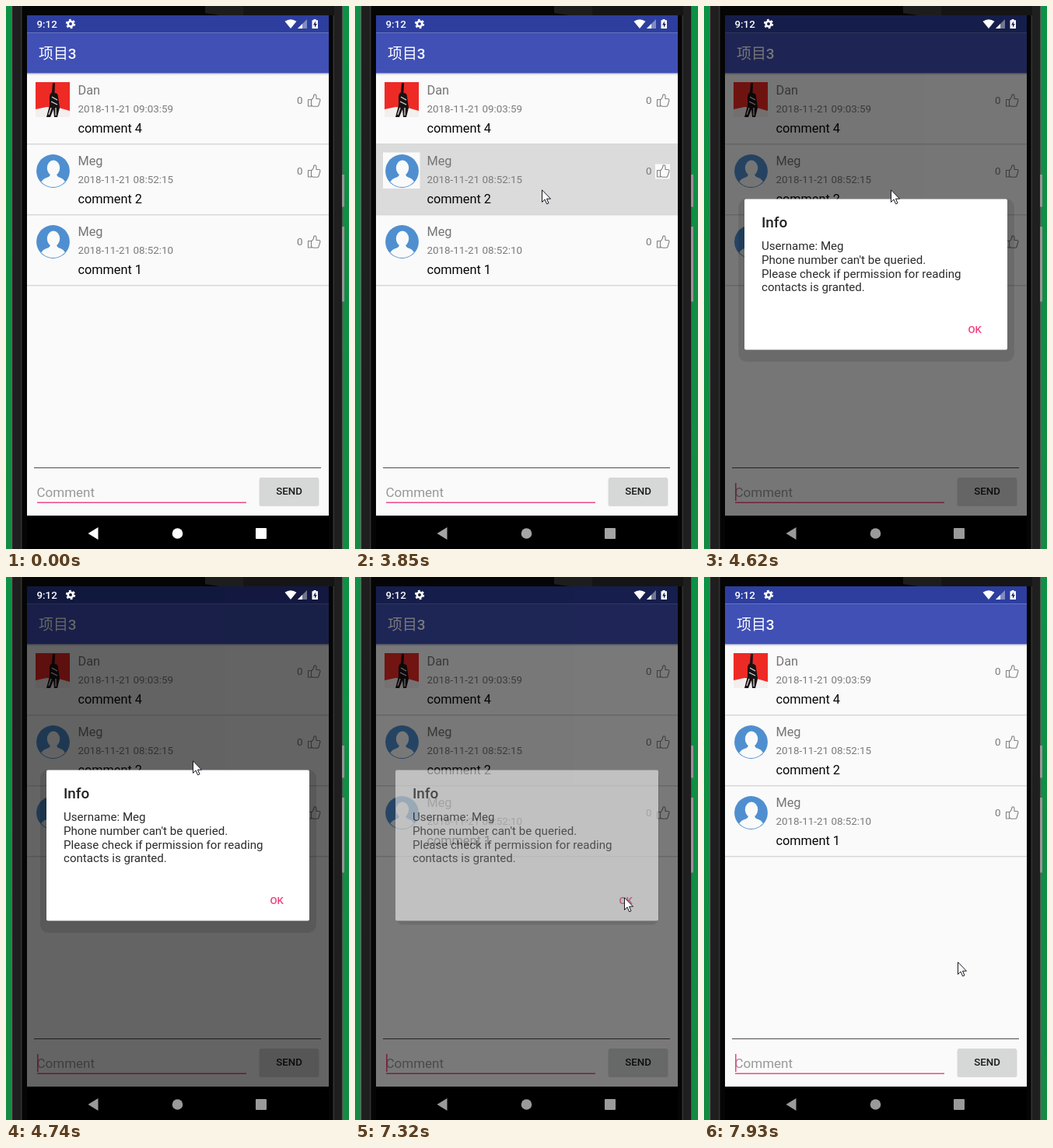
An HTML page that plays this animation: 441 px wide and 699 px high, repeating every 8000 ms.

```html
<!DOCTYPE html>
<html lang="zh-CN">
<head>
<meta charset="utf-8">
<title>Comments</title>
<style>
  html, body { margin: 0; width: 100%; height: 100%; overflow: hidden; background: #000; }
  svg { display: block; width: 100vw; height: 100vh; }
  text { font-family: Roboto, "Noto Sans CJK SC", "Noto Sans CJK", sans-serif; }
  .medium { font-weight: 500; }
  .name { font-size: 16.3px; fill: #757575; }
  .date { font-size: 13.4px; fill: #7b7b7b; }
  .body { font-size: 16.3px; fill: #060606; }
  .info { font-size: 15.1px; fill: #2b2b2b; }

  .anim { animation: 8s linear infinite; }
  #press { animation-name: press; }
  #caret { animation-name: caret; animation-timing-function: step-end; }
  #dim { animation-name: dim; }
  #shade { animation-name: shade; transform-box: fill-box; transform-origin: center; }
  #dialog { animation-name: dialog; }
  #nav { animation-name: nav; }
  #pointer { animation-name: show, move; animation-timing-function: step-end; }

  @keyframes press {
    0%, 46% { opacity: 0; }
    48.125%, 53.1% { opacity: 1; }
    54.4%, 100% { opacity: 0; }
  }
  @keyframes caret {
    0% { opacity: 0; }
    26.875% { opacity: 1; }
    46.125% { opacity: 0; }
    53.125%, 100% { opacity: 1; }
  }
  @keyframes dim {
    0%, 55.5% { opacity: 0; }
    56.25% { opacity: .08; }
    58%, 90.25% { opacity: .6; }
    91.5%, 92.74% { opacity: .52; }
    92.75% { opacity: .32; }
    95%, 100% { opacity: 0; }
  }
  @keyframes shade {
    0%, 55.5% { opacity: 0; transform: scale(.98); }
    56.25% { opacity: .055; transform: scale(.99); }
    58%, 90.25% { opacity: .11; transform: none; }
    91.5%, 92.74% { opacity: .1; transform: translateY(-5px) scale(.955, .95); }
    92.75%, 100% { opacity: 0; transform: scale(.95); }
  }
  @keyframes dialog {
    0%, 55.25% { opacity: 0; }
    56.25% { opacity: .6; }
    57.5%, 90.25% { opacity: 1; }
    91.5%, 92.74% { opacity: .54; }
    92.75% { opacity: .2; }
    94%, 100% { opacity: 0; }
  }
  @keyframes nav {
    0%, 21% { fill: #fff; }
    28.125% { fill: #e0e0e0; }
    48.125% { fill: #a5a5a5; }
    56.25%, 100% { fill: #9a9a9a; }
  }
  @keyframes show {
    0% { opacity: 0; }
    1.875%, 100% { opacity: 1; }
  }
  @keyframes move {
    0% { transform: translate(371px, 668px); }
    1.875% { transform: translate(371px, 668px); animation-timing-function: steps(8); }
    11.875% { transform: translate(243px, 327px); animation-timing-function: steps(9); }
    23.125% { transform: translate(208px, 244px); animation-timing-function: steps(4); }
    28.125% { transform: translate(229px, 237px); }
    29.375% { transform: translate(229px, 237px); animation-timing-function: steps(4); }
    34.375% { transform: translate(241px, 230px); animation-timing-function: steps(3); }
    38.125% { transform: translate(228px, 225px); }
    39.125% { transform: translate(228px, 225px); animation-timing-function: steps(2); }
    42.125% { transform: translate(240px, 236px); }
    58.875% { transform: translate(240px, 236px); animation-timing-function: steps(3); }
    62.625% { transform: translate(269px, 293px); animation-timing-function: steps(9); }
    73.5% { transform: translate(360px, 419px); animation-timing-function: steps(6); }
    81.375% { transform: translate(346px, 412px); }
    92.75% { transform: translate(346px, 412px); animation-timing-function: steps(5); }
    99.125%, 100% { transform: translate(326px, 495px); }
  }
</style>
</head>
<body>
<svg viewBox="0 0 441 699" preserveAspectRatio="none">
  <defs>
    <linearGradient id="green" x2="0" y2="1">
      <stop stop-color="#0c9145"/><stop offset="1" stop-color="#158a43"/>
    </linearGradient>
    <linearGradient id="drop" x2="0" y2="1">
      <stop stop-opacity=".2"/><stop offset="1" stop-opacity="0"/>
    </linearGradient>
    <clipPath id="disc"><circle cx="60.5" cy="34.5" r="20.6"/></clipPath>
    <clipPath id="around">
      <path clip-rule="evenodd" d="M27 12H415V656H27ZM52 248.5V442.5H390V248.5Z"/>
    </clipPath>

    <g id="person">
      <path fill="#fafafa" d="M36 10.5H83.5V57H36Z"/>
      <circle cx="60.5" cy="34.5" r="21.4" fill="#4f8fd0"/>
      <g clip-path="url(#disc)" fill="#fafafa">
        <ellipse cx="61" cy="30.5" rx="8.2" ry="10"/>
        <path d="M43 57Q44 46 51 43.5Q57 42 57 38V34H65V38Q65 42 71 43.5Q77 46 78 57Z"/>
      </g>
    </g>

    <g id="row">
      <text class="date" x="374" y="39">0</text>
      <path fill="#fafafa" d="M386 25.5H405V44.5H386Z"/>
      <g fill="none" stroke="#828282" stroke-width="1.1" stroke-linejoin="round">
        <path d="M388.5 33.5H392.5V42H388.5Z"/>
        <path d="M392.5 34Q396 31 396 27.2Q399 26 399 29.5V32.5H402.5Q404.4 33 403.8 35L402 41Q401.6 42.3 400 42.3H395L392.5 41"/>
      </g>
      <path fill="#d8d8d8" d="M27 90H415V91.5H27Z"/>
    </g>
  </defs>

  <!-- phone body -->
  <path fill="url(#green)" d="M0 0H441V699H0Z"/>
  <path fill="#050505" d="M7 0H433V699H7Z"/>
  <path fill="#666" d="M7 0H8.5V699H7Z"/>
  <path fill="#1f1f1f" d="M8.5 0H19V699H8.5ZM422 0H432V699H422Z"/>
  <path fill="#343434" d="M19 0H20.5V699H19ZM420.5 0H422V699H420.5Z"/>
  <path fill="#151515" d="M256 0H422V12H276L256 9Z"/>
  <path fill="#1d1d1d" d="M256 0H305V12H276L256 9Z"/>
  <path fill="#555" d="M432 0H433V699H432Z"/>
  <path fill="#9d9198" d="M432 217H435V258.5H432ZM432 284H435V380.5H432Z"/>

  <!-- app -->
  <path fill="#fafafa" d="M27 12H415V656H27Z"/>
  <path fill="url(#drop)" d="M27 86.5H415V89.5H27Z"/>
  <path fill="#2d3e9e" d="M27 12H415V34.5H27Z"/>
  <path fill="#4050b5" d="M27 34.5H415V86.5H27Z"/>
  <text class="medium" x="42" y="68" font-size="18.9" fill="#fff">项目3</text>

  <path id="press" class="anim" fill="#dbdbdb" d="M27 178H415V269H27Z"/>

  <g transform="translate(0 87)">
    <use href="#row"/>
    <path fill="#ee2a25" d="M38 11H82V48H38Z"/>
    <path fill="#f3efee" d="M38 46L52 43L68 44L82 48V56H38Z"/>
    <path fill="#181315" d="M60 12H63L62.5 25Q67 25 67 30L69 44L66 56H62L61 46L57 56H52L56 41V30Q56 26 59 24Z"/>
    <path fill="none" stroke="#e4dcda" stroke-width="1.3" d="M59 30L66 34M58 36L66 40M64 44V54M58 44L55 53"/>
    <text class="name" x="92.5" y="27">Dan</text>
    <text class="date" x="92.5" y="50">2018-11-21 09:03:59</text>
    <text class="body" x="92.5" y="76">comment 4</text>
  </g>
  <g transform="translate(0 178)">
    <use href="#row"/><use href="#person"/>
    <text class="name" x="92.5" y="27">Meg</text>
    <text class="date" x="92.5" y="50">2018-11-21 08:52:15</text>
    <text class="body" x="92.5" y="76">comment 2</text>
  </g>
  <g transform="translate(0 269)">
    <use href="#row"/><use href="#person"/>
    <text class="name" x="92.5" y="27">Meg</text>
    <text class="date" x="92.5" y="50">2018-11-21 08:52:10</text>
    <text class="body" x="92.5" y="76">comment 1</text>
  </g>

  <path fill="#4c4c4c" d="M36 594H405V595H36Z"/>
  <text x="39.5" y="632" font-size="17" fill="#999">Comment</text>
  <path fill="#f0498a" d="M40 638.4H309V640H40Z"/>
  <path id="caret" class="anim" fill="#f0498a" d="M40 614H41.6V637H40Z"/>
  <rect x="325.5" y="608" width="77" height="36" rx="2.5" opacity=".13"/>
  <rect x="326" y="607" width="76" height="35.5" rx="2" fill="#d6d7d7"/>
  <text class="medium" x="364" y="629" font-size="13.3" fill="#1a1a1a" text-anchor="middle">SEND</text>

  <!-- dialog -->
  <path id="dim" class="anim" d="M27 12H415V656H27Z"/>
  <g clip-path="url(#around)">
    <rect id="shade" class="anim" x="44" y="248" width="355" height="210" rx="11"/>
  </g>
  <g id="dialog" class="anim">
    <rect x="52" y="248.5" width="338" height="194" rx="2" fill="#fff"/>
    <text class="medium" x="74" y="285" font-size="18.9" fill="#212121">Info</text>
    <text class="info" x="74" y="314">Username: Meg</text>
    <text class="info" x="74" y="332">Phone number can't be queried.</text>
    <text class="info" x="74" y="349.7">Please check if permission for reading</text>
    <text class="info" x="74" y="367.4">contacts is granted.</text>
    <text class="medium" x="339.5" y="421" font-size="13.2" fill="#f5417f">OK</text>
  </g>

  <!-- status bar -->
  <g fill="#fff">
    <text class="medium" x="39.5" y="28" font-size="13.3">9:12</text>
    <g fill="none" stroke="#fff">
      <circle cx="83" cy="23" r="3.3" stroke-width="2.6"/>
      <circle cx="83" cy="23" r="5" stroke-width="2.4" stroke-dasharray="2.6 2.636"/>
    </g>
    <path d="M366 29L358.5 19.8Q366 14.5 373.5 19.8Z"/>
    <path opacity=".4" d="M387 17V29H375Z"/>
    <path d="M381 23V29H375Z"/>
    <path d="M395.5 17H398.5V18.3H401V29H393.5V18.3H395.5Z"/>
    <path fill="#1d2763" d="M398 19.5L395 24.5H397V28L399.8 23H398Z"/>
  </g>

  <!-- navigation -->
  <path d="M27 656H415V699H27Z"/>
  <g id="nav" class="anim">
    <path d="M105.500 679L118.500 671V687Z"/>
    <circle cx="220.5" cy="679" r="6.8"/>
    <rect x="321" y="672" width="14" height="14" rx="1"/>
  </g>

  <path id="pointer" class="anim" fill="#fff" stroke="#151520" stroke-width="1"
    d="M.5 .8V16.5L4 13L6.6 18.8L9 17.8L6.5 12.2H11.5Z"/>
</svg>
</body>
</html>
```
